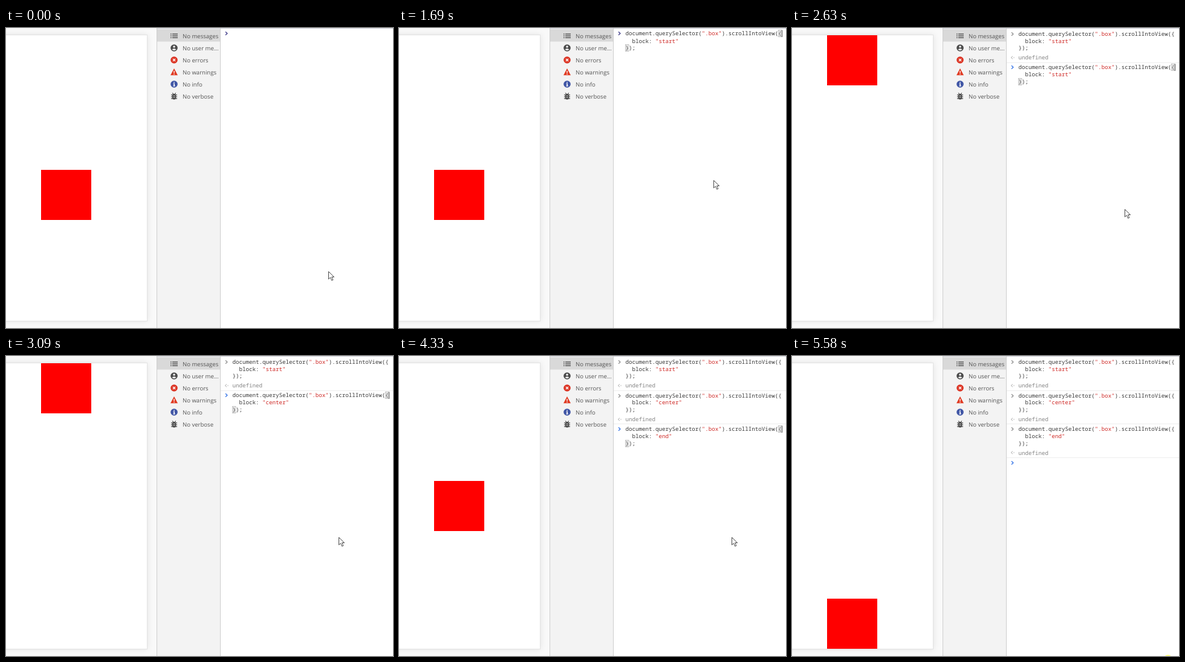
These frames come from a looping animation (640 by 497 pixels, 5650 ms). An HTML page:

```html
<!DOCTYPE html>
<html lang="en">
<head>
<meta charset="utf-8">
<title>scrollIntoView block options</title>
<style>
  html, body { margin: 0; width: 100%; height: 100%; overflow: hidden; background: #fff; }
  svg { display: block; width: 640px; height: 497px; }
  text { text-rendering: geometricPrecision; white-space: pre; }
  .menu text { font: 9.55px "Open Sans", "Noto Sans", sans-serif; fill: #555; }
  .code { font: 9.167px "Noto Sans Mono", "DejaVu Sans Mono", monospace; fill: #3a3a3a; }
  .str { fill: #cf2a27; }
  .dim { fill: #858585; }
  .card { filter: drop-shadow(0 0 5px rgba(0, 0, 0, .09)); }
</style>
</head>
<body>
<svg viewBox="0 0 640 497">
  <rect width="249" height="497" fill="#f9f9f9"/>
  <rect class="card" x="-20" y="11.5" width="253.5" height="474" fill="#fff" stroke="#e2e2e2"/>
  <rect id="box" x="58" y="235" width="83" height="83" fill="#f00"/>

  <rect x="249" width="106" height="497" fill="#f3f3f3"/>
  <rect x="249" y="2" width="105" height="20.5" fill="#d9d9d9"/>
  <rect x="355" width="285" height="497" fill="#fff"/>
  <path d="M249.5 0V497M354.5 0V497" stroke="#cecece"/>
  <path d="M249 .5H640" stroke="#cbcdd4"/>

  <g class="menu" id="menu">
    <path d="M272 10h1.7M272 13h1.7M272 16h1.7M275 10h9M275 13h9M275 16h9" stroke="#555" stroke-width="1.3"/>
    <g transform="translate(278 33)">
      <circle r="5.8" fill="#4a4a4a"/>
      <circle cy="-2" r="1.8" fill="#f3f3f3"/>
      <path d="M-3.5 2.5Q0-.6 3.5 2.5Q0 6 -3.5 2.5" fill="#f3f3f3"/>
    </g>
    <g transform="translate(278 53)">
      <circle r="5.8" fill="#dc3626"/>
      <path d="M-2 -2L2 2M2 -2L-2 2" stroke="#fff" stroke-width="1.4"/>
    </g>
    <g transform="translate(278 73)">
      <path d="M0-6L6 5.3H-6Z" fill="#e03a22"/>
      <path d="M0-2V1.7M0 2.8V4.2" stroke="#fff" stroke-width="1.4"/>
    </g>
    <g transform="translate(278 93)">
      <circle r="5.8" fill="#3f55a5"/>
      <path d="M0-3.6V-2.1M-1.3-.6H.2V3M-1.5 3H1.6" stroke="#fff" stroke-width="1.5" fill="none"/>
    </g>
    <g transform="translate(278 113)">
      <rect x="-3" y="-3.8" width="6" height="9.3" rx="3" fill="#444"/>
      <path d="M-5-2.2H5M-5 .8H5M-5 3.8H5M-2.8-5.4L-1-3.4M2.8-5.4L1-3.4" stroke="#444" stroke-width="1.3"/>
      <path d="M-1.3-.5H1.3M-1.3 2.2H1.3" stroke="#f3f3f3"/>
    </g>
  </g>

  <g id="log"></g>
  <circle id="glow" cx="621.8" cy="502.5" r="7.5" fill="#ffff80"/>
  <path id="mouse" d="M.5 .5V13L3.5 10.2L5.6 15.2L7.8 14.3L5.7 9.5H9.6Z" fill="#fff" stroke="#333" stroke-width=".9"/>
</svg>

<script>
const LOOP = 5650, LEFT = 374.5, CHAR = 5.5, BLOCK = 55.7;
const get = id => document.getElementById(id);
const order = ["start", "center", "end"];

// time, committed commands, printed results, command being edited, box top
const steps = [
  [0, 0, 0, "", 235],
  [380, 0, 0, "end", 235],
  [1310, 0, 0, "center", 235],
  [1690, 0, 0, "start", 235],
  [2090, 1, 0, "", 12],
  [2170, 1, 1, "", 12],
  [2630, 1, 1, "start", 12],
  [2860, 1, 1, "end", 12],
  [3090, 1, 1, "center", 12],
  [3550, 2, 2, "", 207],
  [3930, 2, 2, "center", 207],
  [4160, 2, 2, "start", 207],
  [4330, 2, 2, "end", 207],
  [4880, 3, 3, "", 402]
];

// start, end, number of hops, from, to
const moves = [
  [70, 220, 3, [533, 403], [520, 252]],
  [2320, 2400, 2, [520, 252], [550, 300]],
  [5030, 5410, 6, [550, 300], [617, 500]]
];

["No messages", "No user me...", "No errors", "No warnings", "No info", "No verbose"]
  .forEach((label, i) => {
    get("menu").insertAdjacentHTML("beforeend", `<text x="292" y="${17 + i * 20}">${label}</text>`);
  });

const line = (col, y, body, cls = "") =>
  `<text class="code ${cls}" x="${LEFT + col * CHAR}" y="${Math.round(y)}">${body}</text>`;
const str = s => `<tspan class="str">"${s}"</tspan>`;
const chevron = (y, color) =>
  `<path d="M363 ${y - 2.7}l2.9 2.7l-2.9 2.7" fill="none" stroke="${color}" stroke-width="1.4"/>`;
const caretAt = (x, y) => `<path d="M${x} ${y - 5.5}v11.5" stroke="#555"/>`;
const brace = (col, y) =>
  `<rect x="${LEFT + col * CHAR}" y="${Math.round(y) - 8.5}" width="5.5" height="11" fill="#f0f0f0" stroke="#b5b5b5" stroke-width=".8"/>`;

function command(top, value, first) {
  return line(0, top + first, `document.querySelector(${str(".box")}).scrollIntoView({`) +
    line(2, top + 24.5, `block: ${str(value)}`) +
    line(0, top + 36.4, "});");
}

function result(top) {
  const y = Math.round(top + 49);
  return `<path d="M365 ${y - 2.3}l-2.6 2.3l2.6 2.3M366.3 ${y}h1.4" fill="none" stroke="#a5a5a5"/>` +
    line(0, top + 52.4, "undefined", "dim");
}

function drawLog([time, done, printed, active], caret) {
  let html = "", top = 0;
  for (let i = 0; i < done; i++) {
    html += chevron(Math.round(top + 10), "#949494") + command(top, order[i], 13);
    if (i < printed) html += result(top);
    top += i < printed ? BLOCK : 40;
    html += `<path d="M355 ${Math.round(top + .8) + .5}H640" stroke="#ededed"/>`;
  }
  const y = Math.round(top + 9.4);
  html += chevron(y, time < 2090 ? "#44408c" : "#3b78e7");
  if (active) html += brace(46, top + 12.4) + brace(0, top + 36.4) + command(top, active, 12.4);
  if (caret) html += caretAt(active ? 633.5 : 375.5, y);
  return html;
}

function mousePos(t) {
  let pos = moves[0][3];
  for (const [start, end, hops, from, to] of moves) {
    if (t < start) break;
    const gap = (end - start) / (hops - 1);
    const k = Math.min(hops, Math.floor((t - start) / gap + 1e-6) + 1) / hops;
    pos = from.map((v, i) => Math.round(v + (to[i] - v) * k));
  }
  return pos;
}

let shown = "";
function render(t) {
  const step = steps.findLast(s => s[0] <= t);
  const caret = t >= 220 && t < 5410;
  const key = step[0] + "|" + caret;
  if (key !== shown) {
    shown = key;
    get("log").innerHTML = drawLog(step, caret);
    get("box").setAttribute("y", step[4]);
  }
  get("mouse").setAttribute("transform", `translate(${mousePos(t)})`);
  get("glow").setAttribute("visibility", t >= 5580 ? "visible" : "hidden");
}

const begin = performance.now();
function tick() {
  render((performance.now() - begin) % LOOP);
  requestAnimationFrame(tick);
}
tick();
</script>
</body>
</html>
```
